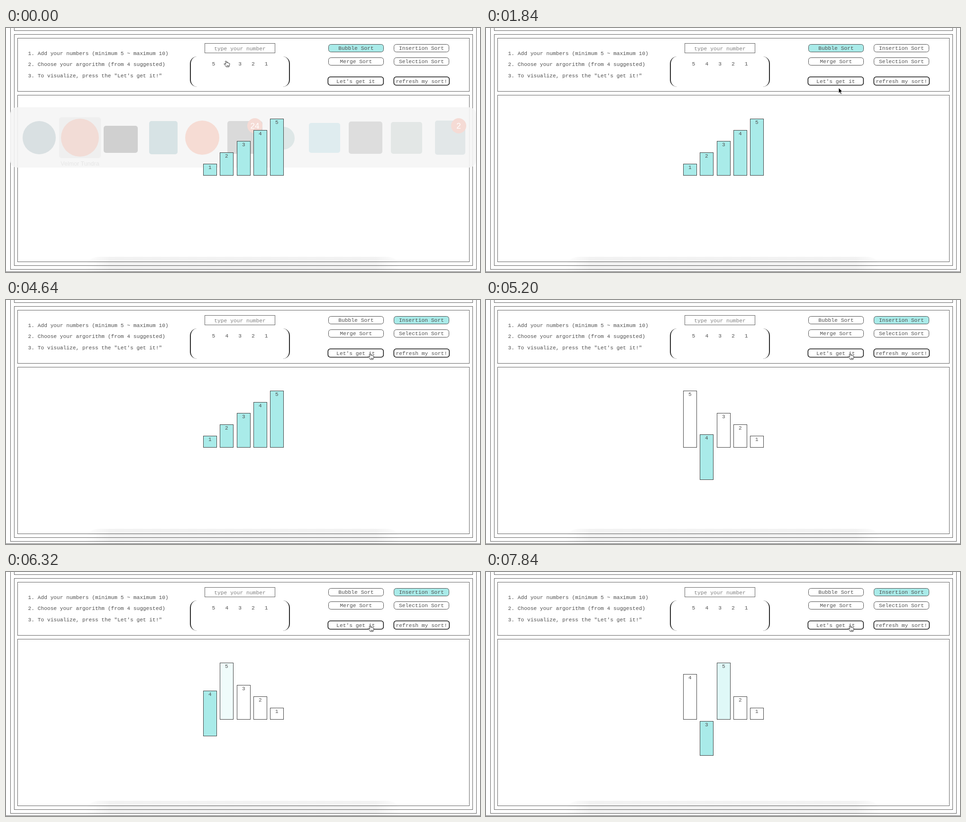
Write an HTML page that moves like this. It is 1000x514 px and loops after 8 s.

```html
<!DOCTYPE html>
<html lang="en">
<head>
<meta charset="utf-8">
<title>Sorting visualizer</title>
<style>
  html, body { margin: 0; width: 100%; height: 100%; overflow: hidden; background: #fff; }
  svg { position: absolute; left: 0; top: 0; display: block; }
  text { font: 11.3px "Liberation Mono", monospace; fill: #505050; }
  .mid { text-anchor: middle; }
  .frame { fill: none; stroke: #666; }
  .basket {
    position: absolute; left: 388px; top: 60px; width: 211px; height: 64px;
    box-sizing: border-box; border: solid #2a2a2a; border-width: 0 2px; border-radius: 15px;
  }
</style>
</head>
<body>
<div class="basket"></div>
<svg id="stage" width="1000" height="514" viewBox="0 0 1000 514">
  <defs>
    <linearGradient id="shade">
      <stop offset="0" stop-opacity="0"/>
      <stop offset=".08" stop-opacity=".05"/>
      <stop offset=".92" stop-opacity=".05"/>
      <stop offset="1" stop-opacity="0"/>
    </linearGradient>
  </defs>
  <g id="page"></g>
  <g id="dock"></g>
  <g id="bars"></g>
  <rect x="166" y="482" width="668" height="70" rx="30" fill="url(#shade)"/>
  <g id="cursor" stroke-linejoin="round">
    <path id="arrow" d="M0 0V11.4L2.6 9L4.5 13.4L6.4 12.6L4.5 8.3H8.1Z" fill="#000" stroke="#fff" stroke-width=".8"/>
    <path id="hand" d="M-1.3 .8Q0-.8 1.2 .8L1.7 4Q3-.2 4 4.2Q5.4 3 6 4.9Q7.8 4 8 6.3L7.4 9.6L6.4 12.4H.6L-1.6 9.2L-4 6.4Q-3.6 4.6-1.8 6L-.3 7.2ZM2 9V11M3.7 9V11M5.3 9V11" fill="#fff" stroke="#222" stroke-width=".9"/>
  </g>
</svg>
<script>
const LOOP = 8000, TICK = 80;
const TEAL = '#a9ebe9';
const $ = id => document.getElementById(id);

function add(parent, tag, attrs, content) {
  const el = document.createElementNS('http://www.w3.org/2000/svg', tag);
  for (const key in attrs) el.setAttribute(key, attrs[key]);
  if (content !== undefined) el.textContent = content;
  return parent.appendChild(el);
}
const box = (parent, x, y, width, height, more) =>
  add(parent, 'rect', { x, y, width, height, ...more });
const label = (parent, x, y, content, more) =>
  add(parent, 'text', { x, y, class: 'mid', ...more }, content);

// Static page
const page = $('page');
[[17.5, -10, 967, 15.5], [9.5, -10, 983, 518.5], [17.5, 13.5, 967, 487],
 [24.5, 21.5, 953, 112], [24.5, 141.5, 953, 351], [-5, -10, 1010, 523.5],
 [419.5, 32.5, 148, 20]].forEach(r => box(page, ...r, { class: 'frame' }));

['1. Add your numbers (minimum 5 ~ maximum 10)',
 '2. Choose your argorithm (from 4 suggested)',
 '3. To visualize, press the "Let\'s get it!"'].forEach((line, i) =>
  add(page, 'text', { x: 46.5, y: 56.5 + i * 23.9, style: 'font-size:11.22px' }, line));

label(page, 493.5, 46.5, 'type your number', { style: 'fill:#808080' });
[5, 4, 3, 2, 1].forEach((n, i) => label(page, 438 + i * 27.8, 78.5, n));

const hotSpots = [[430, 67, 126, 16]];
function button(x, y, w, h, name, stroke, color) {
  const rect = box(page, x, y, w, h,
    { rx: 5, fill: '#fff', stroke: color, 'stroke-width': stroke });
  label(page, x + w / 2, y + h / 2 + 3.8, name);
  hotSpots.push([x, y, w, h]);
  return rect;
}
const choice = (x, y, name) => button(x, y, 116, 16, name, 1, '#505050');
const action = (x, name) => button(x, 103, 117, 17.5, name, 1.6, '#1a1a1a');
const bubble = choice(680.5, 34.5, 'Bubble Sort');
const insertion = choice(818.5, 34.5, 'Insertion Sort');
choice(680.5, 62.5, 'Merge Sort');
choice(818.5, 62.5, 'Selection Sort');
action(679.3, "Let's get it");
action(818.3, 'refresh my sort!');

// Fading app switcher
const dock = $('dock');
const disc = (cx, cy, r, fill) => add(dock, 'circle', { cx, cy, r, fill });
box(dock, 9, 167, 982, 127, { rx: 14, fill: '#f6f6f6' });
box(dock, 112, 188, 88, 86, { rx: 5, fill: '#eee' });
disc(70, 231, 35, '#d5dddf');
disc(156, 231, 40, '#f1d9d2');
disc(414, 231, 36, '#f6d9d0');
disc(585, 232, 24, '#dbe5e5');
[[206, 206, 72, 57, '#cbcccc'], [302, 196, 60, 70, '#d3e0e3'],
 [467, 196, 74, 69, '#d6d6d6'], [639, 200, 66, 63, '#dcebee'],
 [723, 197, 71, 68, '#dadada'], [812, 198, 66, 67, '#e0e5e4'],
 [905, 195, 64, 72, '#dfe5e6']].forEach(([x, y, w, h, fill]) =>
  box(dock, x, y, w, h, { rx: 5, fill }));
[[525, '24'], [955, '2']].forEach(([x, count]) => {
  disc(x, 206, 16, '#f5d8d1');
  label(dock, x, 212, count, { style: 'font:17px "Liberation Sans",sans-serif;fill:#fff' });
});
label(dock, 156, 290, 'Velmor Tundra',
  { style: 'font:12.5px "Liberation Sans",sans-serif;fill:#e4e4e4' });

// Bars, kept on whole pixels so that their outlines stay crisp
const UNIT = 23.85, BASE = 310;
const snap = v => Math.round(v) + .5;
const bars = [1, 2, 3, 4, 5].map(n => {
  const g = add($('bars'), 'g', {});
  const rect = box(g, 0, 0, 28, Math.round(n * UNIT), { fill: TEAL, stroke: '#444' });
  label(g, 13.8, 10, n, { style: 'font-size:11px' });
  return { n, g, rect };
});

// cubic-bezier(.25, .1, .25, 1)
function ease(x) {
  if (x <= 0) return 0;
  if (x >= 1) return 1;
  const curve = (a, b, s) => 3 * a * s * (1 - s) ** 2 + 3 * b * s * s * (1 - s) + s ** 3;
  let lo = 0, hi = 1;
  for (let i = 0; i < 20; i++) {
    const m = (lo + hi) / 2;
    if (curve(.25, .25, m) < x) lo = m; else hi = m;
  }
  return curve(.1, 1, lo);
}

const RESET = 4720, SELECT = 3040, DROP = 75.5, PALE = .38;
const rounds = [{ start: 4890, key: 4, slot: 1 }, { start: 6980, key: 3, slot: 2 }];

function barState(t) {
  const sorted = t < RESET;
  const state = bars.map(({ n }) =>
    ({ slot: sorted ? n - 1 : 5 - n, drop: 0, tint: sorted ? 1 : 0 }));
  if (sorted) return state;
  for (const { start, key, slot } of rounds) {
    const phase = delay => ease((t - start - delay) / 500);
    const moving = state[key - 1], rival = state[4];
    moving.tint += phase(-170) - phase(1680);
    moving.drop += DROP * (phase(0) - phase(1274));
    rival.tint += PALE * (phase(418) - phase(1274));
    if (t >= start + 836) {
      moving.slot = slot - 1;
      rival.slot = slot;
    }
  }
  return state;
}

// Pointer tip: time, x, y
const route = [
  [0, 464, 69.5], [560, 464, 69.5], [640, 490, 82], [880, 641.5, 157], [1120, 705, 148],
  [1440, 746, 126], [1840, 744, 126], [2000, 748, 122], [2400, 818, 68],
  [2720, 859, 37.5], [3120, 859, 37.5], [3360, 818, 72], [3600, 778, 108], [3760, 768, 113],
  [LOOP, 768, 113]
];
function pointer(t) {
  const i = route.findIndex(p => p[0] > t);
  const [t0, x0, y0] = route[i - 1], [t1, x1, y1] = route[i];
  const f = (t - t0) / (t1 - t0);
  return [x0 + (x1 - x0) * f, y0 + (y1 - y0) * f];
}

function draw(t) {
  dock.setAttribute('opacity', Math.max(0, .9 - t / 320));

  const chosen = t >= SELECT;
  bubble.setAttribute('fill', chosen ? '#fff' : TEAL);
  insertion.setAttribute('fill', chosen ? TEAL : '#fff');

  barState(t).forEach(({ slot, drop, tint }, i) => {
    const { n, g, rect } = bars[i];
    const x = snap(416.2 + slot * 35.2), y = snap(drop) + BASE - Math.round(n * UNIT);
    g.setAttribute('transform', `translate(${x} ${y})`);
    rect.setAttribute('fill-opacity', tint);
  });

  const [x, y] = pointer(t);
  const hot = hotSpots.some(([l, top, w, h]) => x >= l && x <= l + w && y >= top && y <= top + h);
  $('cursor').setAttribute('transform', `translate(${x} ${y})`);
  $('hand').style.display = hot ? '' : 'none';
  $('arrow').style.display = hot ? 'none' : '';
}

const origin = performance.now();
function loop() {
  const t = (performance.now() - origin) % LOOP;
  draw(Math.floor(t / TICK) * TICK);
  requestAnimationFrame(loop);
}
draw(0);
requestAnimationFrame(loop);
</script>
</body>
</html>
```
